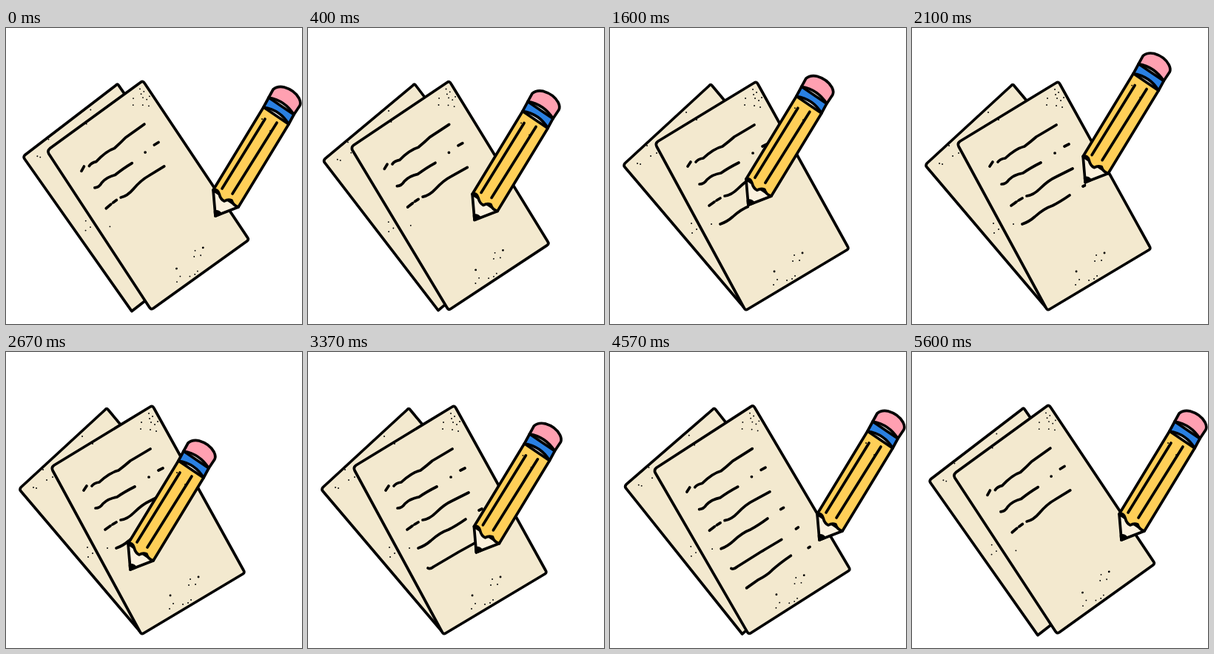
These frames come from a looping animation (400 by 400 pixels, 5730 ms). An HTML page:

```html
<!DOCTYPE html>
<html lang="en">
<head>
<meta charset="utf-8">
<title>Pencil writing on paper</title>
<style>
  html, body { margin: 0; width: 100%; height: 100%; overflow: hidden; background: #fff; }
  svg { display: block; width: 100vw; height: 100vh; }
  .ink { fill: none; stroke: #000; stroke-width: 3.7; stroke-linecap: round; stroke-linejoin: round; }
  .page { fill: #f3e9cf; }
  .specks { stroke-width: 1.8; }
  .big { stroke-width: 2.8; }
</style>
</head>
<body>
<svg viewBox="0 0 400 400">
  <defs>
    <clipPath id="wipe0"><rect y="0" height="400"/></clipPath>
    <clipPath id="wipe1"><rect y="0" height="400"/></clipPath>
    <clipPath id="wipe2"><rect y="0" height="400"/></clipPath>
  </defs>

  <g id="back" class="ink">
    <path class="page" d="M20 183L134 78Q136 75 138 78L300 271L183 380L20 188Q18 186 20 183Z"/>
    <path class="specks" d="M103 114h.1M37 183h.1M41 184h.1M50 159h.1M55 173h.1M63 169h.1M110 264h.1M117 272h.1M111 277h.1"/>
  </g>

  <g id="front" class="ink">
    <path class="page" d="M65 153L195 74Q198 72 200 76L321 295Q323 298 320 300L186 380Q183 382 181 378L63 160Q61 156 65 153Z"/>
    <path class="specks" d="M183 95h.1M193 83h.1M198 87h.1M194 90h.1M196 95h.1M205 94h.1M201 98h.1M195 105h.1M203 107h.1M182 104h.1M117 124h.1M137 265h.1M249 307h.1M247 315h.1M256 314h.1M226 340h.1M250 335h.1M239 341h.1M246 339h.1M221 347h.1"/>
    <path class="big" d="M260 304h.1M222 329h.1"/>
    <path d="M105 187L109 181M116 181Q119 177 126 176Q140 163 152 160Q160 154 168 147Q180 140 195 131M193 169h.1M206 160L212 157"/>
    <path d="M121 211Q127 211 131 205Q138 198 150 196Q160 189 174 182M134 240L141 235M144 233L149 230M155 227Q164 226 173 217Q184 206 195 201L217 190"/>
    <path clip-path="url(#wipe0)" d="M149 265Q158 262 166 255Q178 244 190 240Q200 235 213 226M231 214L235 212"/>
    <path clip-path="url(#wipe1)" d="M162 292Q165 294 170 290L204 270Q215 264 231 255M251 241L254 239"/>
    <path clip-path="url(#wipe2)" d="M182 319L197 309Q211 302 217 296Q226 288 243 277M267 267L269 266"/>
  </g>

  <g id="pencil" class="ink">
    <path fill="#fbf1de" d="M281 219L284 254L315 242Z"/>
    <path fill="#000" d="M284 254L283.500 248Q288 247 291 251Z"/>
    <path fill="#ffcf58" d="M349 107L281 219Q287 217 289 224Q291 232 296 234Q301 231 306 233Q308 240 315 242L383 130Z"/>
    <path fill="#2a80e2" d="M349 107L356 94L390 117L383 130Q372 111 349 107Z"/>
    <path fill="#ffa0b1" d="M356 94L362 83Q368 78 377 80Q391 84 397 95Q400 101 398 105L390 117Q378 98 356 94Z"/>
    <path d="M351 123L293 217M367 128L307 224"/>
    <path class="specks" d="M347 123h.1M358 139h.1"/>
  </g>
</svg>

<script>
const LOOP = 5730, STEP = 80;

// Pencil tip stops: time, x, y
const stops = [
  [0, 284, 254], [900, 145, 267], [1100, 145, 267], [2140, 236, 208],
  [2640, 169, 294], [3160, 259, 237], [3620, 183, 321], [4100, 284, 254]
];

// Each line: writing start and end, left and right edge
const lines = [
  { start: 1100, end: 2140, left: 145, right: 239 },
  { start: 2640, end: 3160, left: 158, right: 258 },
  { start: 3620, end: 4100, left: 178, right: 273 }
];
const ERASE_START = 4600, ERASE_TIME = 333;

const find = id => document.getElementById(id);
const clamp = v => Math.min(1, Math.max(0, v));
const ease = (t, from, to) => {
  const u = clamp((t - from) / (to - from));
  return u * u * (3 - 2 * u);
};
const mix = (a, b, u) => a + (b - a) * u;

function tipAt(t) {
  const i = stops.findIndex(s => s[0] > t);
  if (i < 0) return stops.at(-1).slice(1);
  const [t0, x0, y0] = stops[i - 1], [t1, x1, y1] = stops[i];
  const u = ease(t, t0, t1);
  return [mix(x0, x1, u), mix(y0, y1, u)];
}

function draw(t) {
  const [x, y] = tipAt(t);
  find('pencil').setAttribute('transform', `translate(${x - 285} ${y - 254})`);

  // 0 = pages fanned out, 1 = pages stacked
  const closed = 1 - ease(t, 0, 840) + ease(t, 4180, 5160);
  find('front').setAttribute('transform', `translate(0 ${-closed}) rotate(${-4.8 * closed} 191 227)`);
  find('back').setAttribute('transform', `rotate(${5.2 * closed} 147 237)`);

  lines.forEach(({ start, end, left, right }, i) => {
    const erased = clamp((t - ERASE_START - i * ERASE_TIME) / ERASE_TIME);
    const from = mix(left, right, erased);
    const to = t <= start ? left : t < end ? x : right;
    const rect = document.querySelector(`#wipe${i} rect`);
    rect.setAttribute('x', from);
    rect.setAttribute('width', Math.max(0, to - from));
  });
}

// Poses are held for 80 ms, shown on a 30 fps clock
function tick() {
  const clock = Math.floor((performance.now() % LOOP) * 0.03 + 0.01);
  draw(Math.min(70, Math.floor(clock / 2.4 + 1e-6)) * STEP);
  requestAnimationFrame(tick);
}
tick();
</script>
</body>
</html>
```
